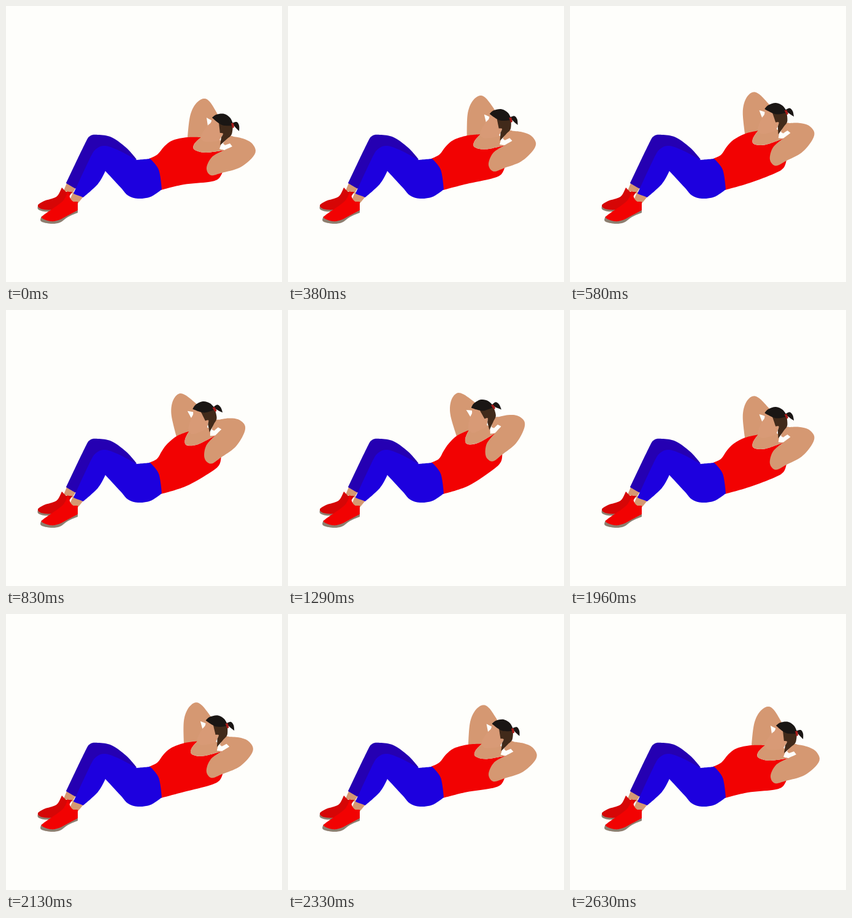
An HTML page that plays this animation: 450 by 450 pixels, repeating every 2.68 s.

```html
<!DOCTYPE html>
<html lang="en">
<head>
<meta charset="utf-8">
<title>Crunches</title>
<style>
html, body { margin: 0; width: 100%; height: 100%; overflow: hidden; background: #fefefb; }
svg { display: block; width: 100vw; height: 100vh; }
</style>
</head>
<body>
<svg id="stage" viewBox="0 0 450 450"></svg>
<script>
const LOOP = 2680, STEP = 1000 / 24;
const PIVOT = { x: 262, y: 262 }, SWING = -23;
const SKIN = "#d59872", FACE = "#d89a76", RED = "#f20202", SOLE = "#8d7f70";
const stage = document.getElementById("stage");

// Key points of an outline; "!" marks a sharp corner.
const parse = text => text.split(" ").map(p => {
  const [x, y] = p.split(",").map(parseFloat);
  return { x, y, sharp: p.endsWith("!") };
});

// Closed smooth curve through the key points.
function curve(pts) {
  const n = pts.length, at = i => pts[(i + n) % n];
  const slope = i => at(i).sharp ? { x: 0, y: 0 } : {
    x: (at(i + 1).x - at(i - 1).x) / 6,
    y: (at(i + 1).y - at(i - 1).y) / 6
  };
  const xy = (x, y) => x.toFixed(2) + " " + y.toFixed(2) + " ";
  let d = "M" + xy(pts[0].x, pts[0].y);
  for (let i = 0; i < n; i++) {
    const a = at(i), b = at(i + 1), u = slope(i), v = slope(i + 1);
    d += "C" + xy(a.x + u.x, a.y + u.y) + xy(b.x - v.x, b.y - v.y) + xy(b.x, b.y);
  }
  return d + "Z";
}

function add(tag, parent) {
  return parent.appendChild(document.createElementNS("http://www.w3.org/2000/svg", tag));
}

function shape(parent, fill, text) {
  const path = add("path", parent);
  path.setAttribute("fill", fill);
  path.setAttribute("d", curve(parse(text)));
  return path;
}

const back = add("g", stage);
shape(back, SKIN, "296,215! 300,180 309,160 322,151 333,157 348,182! 338,188! 327,182! 329,195! 320,217!");

const TORSO = "233,249! 247,242 258,229 272,219 296,214 318,214! 307,225 307,234 325,239 356,235! 353,271! 346,282 330,287 290,291 253,300! 240,285!";
const shirt = shape(stage, RED, TORSO), torso = parse(TORSO);

const front = add("g", stage);
shape(front, SKIN, "318,214! 307,225 307,234 325,239 356,235! 348,233! 352,222! 336,205!");
shape(front, FACE, "336,182! 334,190 327,197 318,212 324,221 347,220! 360,200!");
shape(front, SKIN, "356,235! 336,246 327,264 334,276 352,272 380,264 400,249 407,236 400,223 386,216 371,213! 363,212 354,224! 357,227! 365,224! 369,229!");
shape(front, "#412a1a", "347,190! 370,193! 368,209 360,217 349,227! 351,214! 354,208 349,207!");
shape(front, "#1a1614", "336,182! 343,177 356,176 366,183 371,195! 352,194");
shape(front, "#1a1614", "368,191! 376,189 380,195 380,204! 375,199!");
shape(front, "#a81a18", "367,191! 371,191! 372,198! 369,199!");

// feet
shape(stage, SKIN, "99,289! 114,296! 108,306! 94,301!");
shape(stage, SOLE, "53,323! 52,331 62,335 76,334 90,328! 85,318!");
shape(stage, "#d60606", "91,296! 98,303! 108,303! 94,325! 76,332 58,331 52,325 62,318 78,313 85,308");
shape(stage, SKIN, "110,303! 126,311! 117,322! 103,318!");
shape(stage, SOLE, "58,343! 57,351 73,355 88,353 101,344 117,337! 117,330!");
shape(stage, RED, "101,301! 105,314 110,319! 117,319! 117,333! 100,342 86,349 73,351 59,346 61,341 84,325 95,315");

// legs
shape(stage, "#2500b2", "98,289! 128,226 137,212 150,210 172,214 196,231 213,250! 170,262! 122,300! 112,297!");
shape(stage, "#1d00de", "110,306! 136,250 147,233 162,228 185,236 213,251! 235,249! 249,267 254,299! 236,311 215,314 199,309 187,296 162,269! 150,290 126,312!");

const clamp = v => Math.min(1, Math.max(0, v));
const ease = u => u < 0.5 ? 2 * u * u : 1 - 2 * (1 - u) * (1 - u);
const lift = t => ease(clamp((t - 10) / 1110)) - ease(clamp((t - 1330) / 1300));

// The torso turns more the further a point lies from the waist.
function bend(p, deg) {
  const along = (p.x - 245) * 0.9 - (p.y - 275) * 0.43;
  const a = deg * Math.pow(clamp(along / 75), 1.3) * Math.PI / 180;
  const c = Math.cos(a), s = Math.sin(a), dx = p.x - PIVOT.x, dy = p.y - PIVOT.y;
  return { x: PIVOT.x + dx * c - dy * s, y: PIVOT.y + dx * s + dy * c, sharp: p.sharp };
}

function draw(ms) {
  const t = Math.floor((ms % LOOP + 5) / STEP) * STEP;
  const deg = SWING * lift(t);
  for (const g of [back, front]) g.setAttribute("transform", `rotate(${deg} ${PIVOT.x} ${PIVOT.y})`);
  shirt.setAttribute("d", curve(torso.map(p => bend(p, deg))));
}

let start;
function tick(now) {
  start ??= now;
  draw(now - start);
  requestAnimationFrame(tick);
}
draw(0);
requestAnimationFrame(tick);
</script>
</body>
</html>
```
